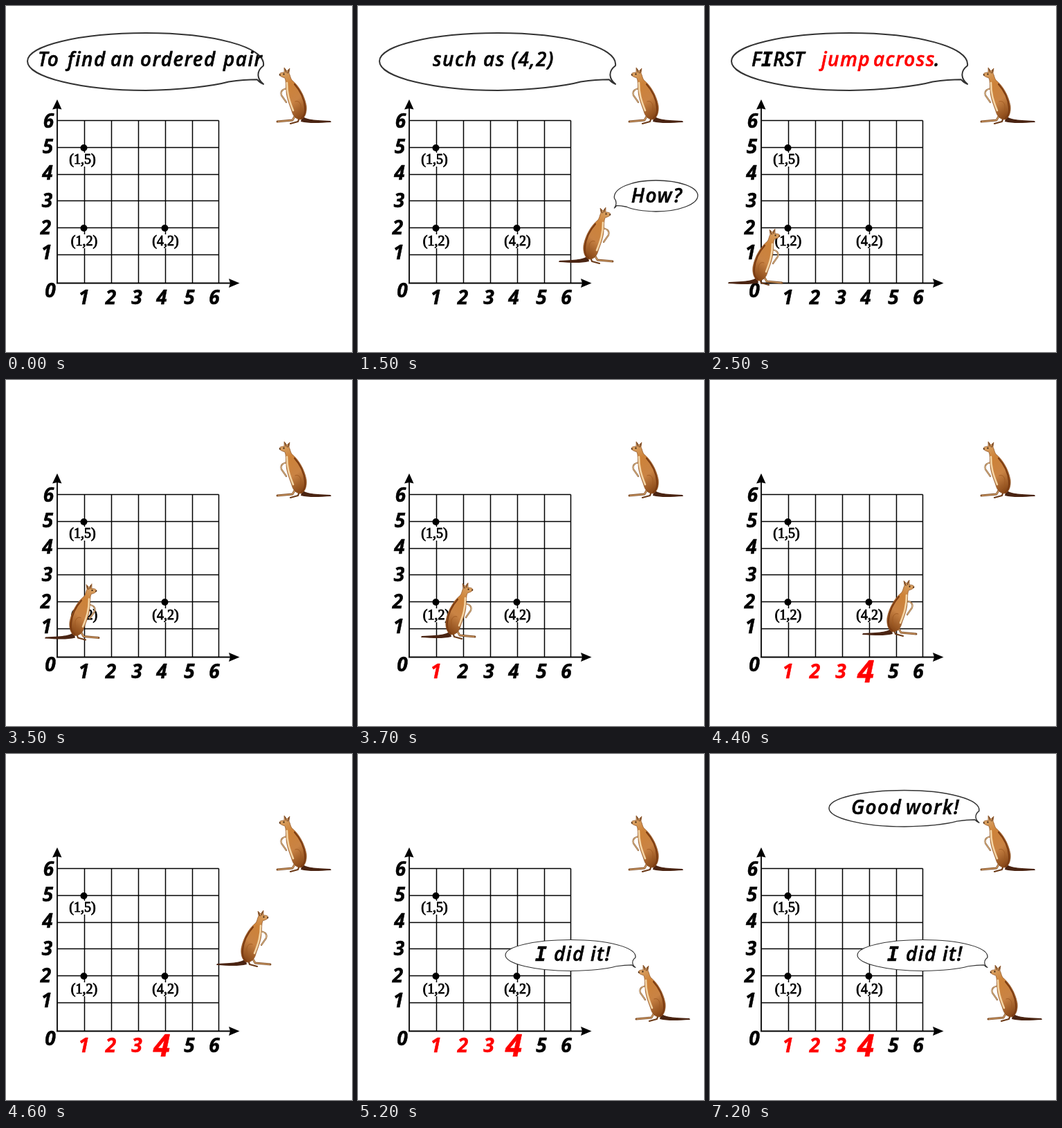
An HTML page that plays this animation: 500 px wide and 500 px high, repeating every 8000 ms.

```html
<!DOCTYPE html>
<html lang="en">
<head>
<meta charset="utf-8">
<title>Ordered pairs</title>
<style>
  html, body { margin: 0; width: 100%; height: 100%; overflow: hidden; background: #fff; }
  svg { display: block; width: 100%; height: 100%; }
  .hand { font: italic 600 28px "Open Sans", "Noto Sans", sans-serif; stroke: currentColor; stroke-width: .5; stroke-linejoin: round; fill: currentColor; color: #000; letter-spacing: 1.4px; }
  .hand .red { color: #f00; fill: #f00; stroke: #f00; }
  .cap { font-family: "DejaVu Sans Mono", monospace; }
  .mid { text-anchor: middle; }
  #digits { letter-spacing: 0; font-weight: 700; }
  .pair { font: 20px "Liberation Serif", serif; text-anchor: middle; stroke: #000; stroke-width: .9; }
  .bubble { fill: #fff; stroke: #333; vector-effect: non-scaling-stroke; stroke-linejoin: round; }
</style>
</head>
<body>
<svg viewBox="0 0 500 500">
  <defs>
    <linearGradient id="fur" x1=".3" y1="0" x2=".65" y2="1">
      <stop offset="0" stop-color="#d9a468"/>
      <stop offset=".3" stop-color="#cd8238"/>
      <stop offset=".65" stop-color="#c98344"/>
      <stop offset="1" stop-color="#8a4a1a"/>
    </linearGradient>
    <g id="roo" fill="none" stroke-linecap="round" stroke-linejoin="round">
      <path d="M38 71 C43 75 50 77 79 78 L80 80 C62 81 48 82 36 79 Z" fill="#4a2412"/>
      <path d="M17 31 C10 32 6 35 8 41 L15 51" stroke="#8a5a30" stroke-width="2.2"/>
      <path d="M17 31 C10 32 6 35 8 41 L15 51" stroke="#f0cf9e" stroke-width="1"/>
      <path d="M28 70 L24 77 L2 79" stroke="#7d4a22" stroke-width="2.8"/>
      <path d="M28 70 L24 77 L3 79" stroke="#e3b27a" stroke-width="1.2"/>
      <path d="M34 73 L32 79 L21 82" stroke="#6b3a18" stroke-width="2.2"/>
      <path d="M12 8 L12 1 L16 6 L20 2 L19 9 C21 13 21 16 23 19 C32 26 41 40 44 56 C45 66 42 74 36 76 C30 76 25 72 23 64 C20 55 15 44 15 34 C14 27 15 21 13 16 C10 15 6 14 5 11 C6 8 9 8 12 8 Z" fill="url(#fur)" stroke="#8a5022" stroke-width=".7"/>
      <path d="M16 23 C16 38 19 48 25 63" stroke="#f4d5a6" stroke-width="2.6"/>
      <path d="M27 25 C35 34 41 46 42 58 C43 66 41 71 37 74" stroke="#7c3c12" stroke-width="2.2"/>
      <path d="M28 50 C33 48 37 53 36 60 C36 65 34 69 30 70" stroke="#a05a22" stroke-width=".9"/>
      <path d="M13 3 L15 8 M19 4 L17 9" stroke="#4a2412" stroke-width="1"/>
      <circle cx="11.5" cy="10.5" r="1" fill="#1c0d04"/>
      <circle cx="5.8" cy="11.4" r="1" fill="#3a1c0a"/>
    </g>
    <path id="balloon" d="M99.7 57 C101 24 78 0 50 0 C22 0 0 22 0 49 C0 77 23 100 50 100 C64 99 78 93 85 85 C90 82 94 81 97 81 C98 86 99 88 99.7 89 C97 80 96.5 67 99.7 57 Z"/>
  </defs>

  <g id="chart"></g>
  <g id="digits" class="hand mid"></g>
  <use href="#roo" x="390" y="88"/>

  <g data-on="0,3500"><g data-bubble="31,39,342,83,2"></g></g>
  <g class="hand" data-on="0,500">
    <text y="87"><tspan x="46">To</tspan><tspan x="89">find</tspan><tspan x="151">an</tspan><tspan x="194">ordered</tspan><tspan x="314">pair</tspan></text>
  </g>
  <g class="hand mid" data-on="500,2500"><text x="196" y="87">such as (4,2)</text></g>
  <g class="hand" data-on="2500,3500">
    <text x="60" y="87" letter-spacing="0"><tspan>F</tspan><tspan class="cap">I</tspan><tspan>RST</tspan></text>
    <text y="87"><tspan class="red" x="161">jump</tspan><tspan class="red" x="236">across</tspan><tspan x="324">.</tspan></text>
  </g>

  <g data-on="1500,2500">
    <g data-bubble="491,252,-121,45,1.3"></g>
    <text class="hand mid" x="432" y="284">How?</text>
  </g>
  <g data-on="5200,8000">
    <g data-bubble="213,268.5,188.5,45,1.2"></g>
    <text class="hand" y="299"><tspan class="cap" x="256">I</tspan><tspan x="283">did</tspan><tspan x="336">it!</tspan></text>
  </g>
  <g data-on="7200,8000">
    <g data-bubble="172,52.5,217.5,52.5,1.5"></g>
    <text class="hand" y="87"><tspan x="204">Good</tspan><tspan x="283">work!</tspan></text>
  </g>

  <use id="jumper" href="#roo"/>
</svg>
<script>
const $ = id => document.getElementById(id);
const LOOP = 8000;

// Grid lines sit on whole pixels
const colX = i => Math.round(74.3 + i * 38.85) + 0.5;
const rowY = i => Math.round(165 + i * 38.75) + 0.5;

function drawChart() {
  const left = 74, base = 400.5;
  let lines = '';
  for (let i = 0; i < 6; i++) {
    lines += `M${colX(i + 1)} ${rowY(0)}V${base}M${left} ${rowY(i)}H${colX(6)}`;
  }
  const pairs = [[1, 5, 110.5, 228], [1, 2, 113, 346], [4, 2, 230.5, 346]];
  $('chart').innerHTML =
    `<path d="${lines}" stroke="#000" stroke-width="1.5"/>
     <path d="M74 145V401M73 400.5H326" stroke="#000" stroke-width="1.8" fill="none"/>
     <path d="M67 149.5L74 135L80.5 149.5L74 148ZM322 394L337.5 400.5L322 407L324 400.5Z"/>` +
    pairs.map(([a, b, x, y]) =>
      `<rect x="${x - 20}" y="${y - 16}" width="40" height="20" fill="#fff"/>
       <circle cx="${colX(a) - 1}" cy="${rowY(6 - b) + 0.5}" r="5"/>
       <text class="pair" x="${x}" y="${y}">(${a},${b})</text>`).join('');
}

function drawDigits() {
  const up = [[64, 421], [58.5, 366], [57.5, 330], [59.5, 291], [60, 251], [60.5, 213], [61.5, 176]];
  const across = [112.5, 151.5, 189, 225, 265, 301];
  const digit = (n, x, y, id) => `<text ${id} x="${x}" y="${y}">${n}</text>`;
  $('digits').innerHTML =
    up.map(([x, y], n) => digit(n, x, y, '')).join('') +
    across.map((x, i) => digit(i + 1, x, 430.5, `id="n${i + 1}"`)).join('');
}

function drawBubbles() {
  const shape = $('balloon').getAttribute('d');
  document.querySelectorAll('[data-bubble]').forEach(g => {
    const [x, y, w, h, line] = g.dataset.bubble.split(',').map(Number);
    g.innerHTML = `<path class="bubble" d="${shape}" stroke-width="${line}"
      transform="translate(${x} ${y}) scale(${w / 100} ${h / 100})"/>`;
  });
}

// Stepped leap away from the axis: start time, left, top
const LEAP = [[4400, 220, 288], [4500, 262, 252], [4600, 304, 225], [4800, 331, 279], [5000, 386, 312], [5200, 400, 304]];

function jumperAt(t) {
  if (t < 500) return null;
  if (t < 2500) return [290, 290];
  if (t < 3500) return [26, 321];
  if (t < 4400) {
    const k = Math.min(8, Math.floor((t - 3500) / 100) + 1);
    return [38.5 + 17.5 * k, k % 2 ? 294.25 - 0.75 * k : 321];
  }
  return LEAP.filter(s => t >= s[0]).pop().slice(1);
}

function render(t) {
  for (const g of timed) {
    g.el.style.display = t >= g.from && t < g.to ? '' : 'none';
  }
  for (let n = 1; n <= 4; n++) {
    $('n' + n).setAttribute('class', t >= 3400 + n * 200 ? 'red' : '');
  }
  const big = t >= 4300;
  $('n4').style.fontSize = big ? '44px' : '28px';
  $('n4').setAttribute('y', big ? 436.5 : 430.5);

  const pos = jumperAt(t), roo = $('jumper');
  roo.style.display = pos ? '' : 'none';
  if (pos) {
    const [x, y] = pos;
    roo.setAttribute('transform', t < 5200
      ? `translate(${x + 80} ${y}) scale(-1 1)`
      : `translate(${x} ${y})`);
  }
}

drawChart();
drawDigits();
drawBubbles();
const timed = [...document.querySelectorAll('[data-on]')].map(el => {
  const [from, to] = el.dataset.on.split(',').map(Number);
  return { el, from, to };
});

const start = performance.now();
function tick() {
  render((performance.now() - start) % LOOP);
  requestAnimationFrame(tick);
}
tick();
</script>
</body>
</html>
```
